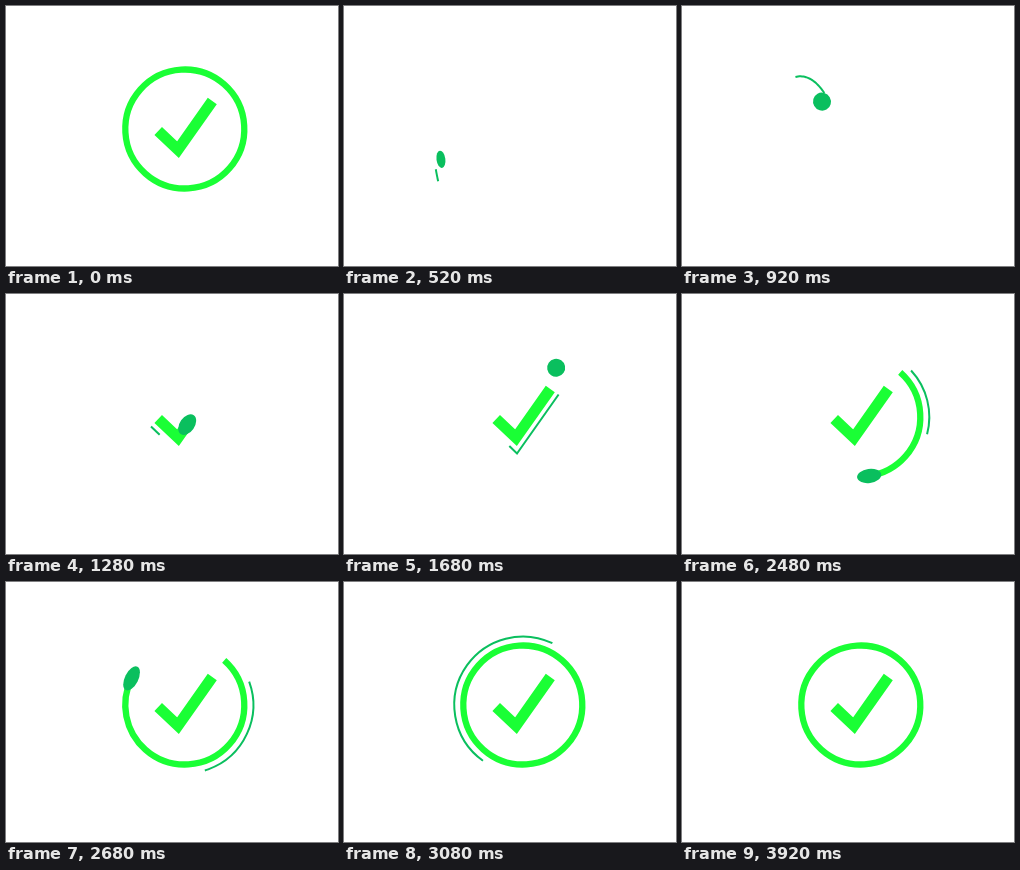
These frames come from a looping animation (332x260 px, 4000 ms). An HTML page with a canvas:

```html
<!DOCTYPE html>
<html lang="en">
<head>
<meta charset="utf-8">
<title>Check mark</title>
<style>
  html, body { margin: 0; width: 100%; height: 100%; overflow: hidden; background: #fff; }
  canvas { display: block; width: 332px; height: 260px; }
</style>
</head>
<body>
<canvas id="stage"></canvas>
<script>
const W = 332, H = 260, LOOP = 4000, STEP = 40;
const HOP = 520, CHECK = 1100, TURN = 1600, RING = 1978, RING_END = 2812;
const GREEN = '#1aff35', DARK = '#0abf5e';

const canvas = document.getElementById('stage');
const ctx = canvas.getContext('2d');
const dpr = window.devicePixelRatio || 1;
canvas.width = W * dpr;
canvas.height = H * dpr;
ctx.scale(dpr, dpr);

const rad = deg => deg * Math.PI / 180;
const dist = (a, b) => Math.hypot(b[0] - a[0], b[1] - a[1]);
const mix = (a, b, k) => a + (b - a) * k;

// Easing from time a to time b
const ramp = (t, a, b) => Math.min(1, Math.max(0, (t - a) / (b - a)));
const easeIn = (t, a, b, power) => ramp(t, a, b) ** power;
const easeOut = (t, a, b, power) => 1 - (1 - ramp(t, a, b)) ** power;
const easeInOut = (t, a, b) => {
  const k = ramp(t, a, b);
  return k * k * (3 - 2 * k);
};

// Shapes
const ring = { x: 178.8, y: 123, r: 59.5, from: -48.5 };
const check = [[152.2, 125], [172, 143.7], [206.3, 95]];
const checkEdge = [[145, 132.5], [173, 159.5], [214.6, 100.5]];
const hop = [[102, 180], [79, 90], [122, 30], check[0]];

const ringPoint = deg => [
  ring.x + ring.r * Math.cos(rad(ring.from + deg)),
  ring.y + ring.r * Math.sin(rad(ring.from + deg))
];
const checkPath = [...check, ringPoint(0)];

const pathLength = points =>
  points.slice(1).reduce((sum, p, i) => sum + dist(points[i], p), 0);
const checkLen = pathLength(check);
const edgeLen = pathLength(checkEdge);
const fullLen = pathLength(checkPath);

// Motion: distance along the check, and degrees around the ring
const checkBall = t => fullLen * easeInOut(t, 1132, 1472);
const ringBall = t => 360 * easeIn(t, RING, RING_END, 2)
  - 12 * Math.sin(Math.PI * ramp(t, TURN, RING));

function hopPoint(u) {
  const v = 1 - u;
  const w = [v * v * v, 3 * v * v * u, 3 * v * u * u, u * u * u];
  return [0, 1].map(i => hop.reduce((sum, p, j) => sum + p[i] * w[j], 0));
}

function along(points, s) {
  for (let i = 0; i < points.length - 1; i++) {
    const a = points[i], b = points[i + 1], d = dist(a, b);
    if (s <= d) return [mix(a[0], b[0], s / d), mix(a[1], b[1], s / d)];
    s -= d;
  }
  return points[points.length - 1];
}

function ballAt(t) {
  if (t < CHECK) return hopPoint(easeOut(t, 480, 1090, 1.6));
  if (t < TURN) return along(checkPath, checkBall(t));
  return ringPoint(ringBall(t));
}

function stroke(color, width) {
  ctx.strokeStyle = color;
  ctx.lineWidth = width;
  ctx.stroke();
}

function drawLine(points, from, to, color, width) {
  if (to <= from) return;
  ctx.save();
  ctx.beginPath();
  points.forEach(p => ctx.lineTo(p[0], p[1]));
  ctx.setLineDash([to - from, 999]);
  ctx.lineDashOffset = -from;
  stroke(color, width);
  ctx.restore();
}

function drawArc(r, from, to, color, width) {
  if (to <= from) return;
  ctx.beginPath();
  ctx.arc(ring.x, ring.y, r, rad(ring.from + from), rad(ring.from + to));
  stroke(color, width);
}

function drawHopTrail(from, to) {
  if (to <= from) return;
  ctx.beginPath();
  for (let i = 0; i <= 24; i++) {
    const u = mix(from, to, i / 24);
    const a = hopPoint(u - .005), b = hopPoint(u + .005), d = dist(a, b);
    const [x, y] = hopPoint(u);
    ctx.lineTo(x + 6.5 * (b[1] - a[1]) / d, y - 6.5 * (b[0] - a[0]) / d);
  }
  stroke(DARK, 2);
}

// The ball stretches along its direction of travel.
function drawBall(t) {
  const [x, y] = ballAt(t), a = ballAt(t - 10), b = ballAt(t + 10);
  const speed = dist(a, b) * 2;
  const stretch = 1 + Math.min(.45, Math.max(0, speed - 9) * .028);
  const r = mix(6, 9, ramp(t, HOP, 900));
  ctx.beginPath();
  ctx.ellipse(x, y, r * stretch, r / stretch ** .8,
    Math.atan2(b[1] - a[1], b[0] - a[0]), 0, 2 * Math.PI);
  ctx.fillStyle = DARK;
  ctx.fill();
}

function drawTrails(t) {
  drawHopTrail(easeIn(t, 460, 1090, 1.6), easeOut(t, 490, 1060, 1.3));
  drawLine(checkEdge, edgeLen * easeIn(t, 1300, 1900, 3),
    edgeLen * easeIn(t, 1160, 1525, 2), DARK, 2);
  if (t > RING) {
    drawArc(ring.r + 9, 360 * easeIn(t, 2197, 3322, 3),
      360 * easeIn(t, 1430, 3100, 3.75), DARK, 2);
  }
}

function draw(t) {
  const idle = t < HOP;
  ctx.fillStyle = '#fff';
  ctx.fillRect(0, 0, W, H);
  drawLine(check, 0, idle ? checkLen : Math.min(checkBall(t), checkLen), GREEN, 11);
  drawArc(ring.r, 0, idle ? 360 : ringBall(t), GREEN, 6.3);
  if (idle) return;
  drawTrails(t);
  if (t < RING_END) drawBall(t);
}

const begin = performance.now();
function frame() {
  const t = (performance.now() - begin) % LOOP;
  draw(Math.floor(t / STEP) * STEP);
  requestAnimationFrame(frame);
}
frame();
</script>
</body>
</html>
```
